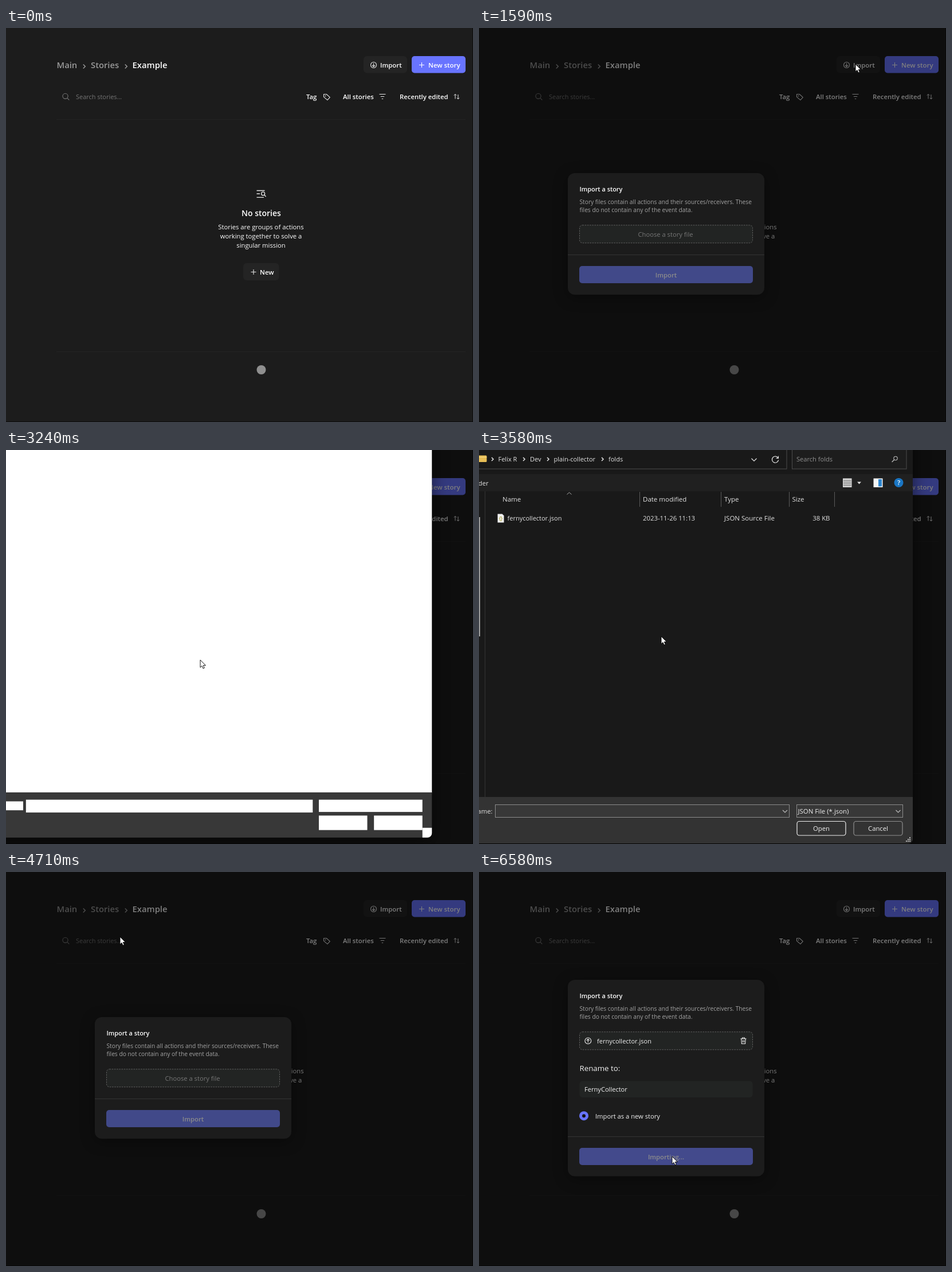
An HTML page for the animation above (8 s loop, 815 by 687 pixels).

```html
<!DOCTYPE html>
<html lang="en">
<head>
<meta charset="utf-8">
<title>Import a story</title>
<style>
  html, body { margin: 0; width: 100%; height: 100%; overflow: hidden; background: #1c1c1c; }
  svg { display: block; font-family: "Open Sans", "Noto Sans", sans-serif; }
  .modal { filter: drop-shadow(0 5px 12px rgba(0, 0, 0, .35)); }
  #dialog { filter: drop-shadow(0 6px 14px rgba(0, 0, 0, .55)); }
</style>
</head>
<body>
<svg id="stage" width="815" height="687"></svg>
<script>
const LOOP = 8000;
const STEP = 66.4;
const BLUE = '#6874ff';
const FILE = 'fernycollector.json';
const STORY = 'FernyCollector';

// Markup helpers; text is placed by the middle of its capitals.
const text = (x, cy, str, size, fill = '#f2f2f2', weight = 400, anchor = 'start', extra = '') =>
  `<text x="${x}" y="${(cy + size * .357).toFixed(2)}" font-size="${size}" fill="${fill}" font-weight="${weight}" text-anchor="${anchor}" ${extra}>${str}</text>`;
const bold = (x, cy, str, size = 11.35, fill = '#fff', anchor = 'start', extra = '') =>
  text(x, cy, str, size, fill, 600, anchor, extra);
const box = (x, y, w, h, fill, r = 0, extra = '') =>
  `<rect x="${x}" y="${y}" width="${w}" height="${h}" rx="${r}" fill="${fill}" ${extra}/>`;
const line = (d, color, width = 1.1, extra = '') =>
  `<path d="${d}" fill="none" stroke="${color}" stroke-width="${width}" ${extra}/>`;
const disc = (x, y, r, fill, extra = '') =>
  `<circle cx="${x}" cy="${y}" r="${r}" fill="${fill}" ${extra}/>`;
const ring = (x, y, r, color, width = 1.1) =>
  disc(x, y, r, 'none', `stroke="${color}" stroke-width="${width}"`);
const plus = (x, y, color) => line(`M${x - 4.5} ${y}h9M${x} ${y - 4.5}v9`, color, 1.1);
const chevron = (x, y, color, s = 3.5) =>
  line(`M${x - s / 2} ${y - s}l${s} ${s}l${-s} ${s}`, color, 1.5);
const chevronDown = (x, y, color, s = 4) =>
  line(`M${x - s} ${y - s / 2}l${s} ${s}l${s} ${-s}`, color, 1.2);

function page() {
  const grey = '#999', icon = '#e6e6e6';
  return box(0, 0, 815, 687, '#1c1c1c')
    + bold(88.5, 65, 'Main', 14.8, grey) + chevron(136.5, 67, grey)
    + bold(148, 65, 'Stories', 14.8, grey) + chevron(209.5, 67, grey)
    + bold(220.5, 65, 'Example', 14.8)
    + box(624, 49, 76, 29.5, '#242424', 6, 'id="importBtn"')
    + ring(641.5, 64.5, 5, icon) + line('M641.5 61.5v6M639 65l2.5 2.5l2.5 -2.5', icon)
    + bold(653, 64.5, 'Import')
    + box(708, 49, 94, 29.5, BLUE, 5) + plus(725.5, 64.5, '#fff')
    + bold(737, 64.5, 'New story', 11.4)
    + ring(103.5, 118.8, 4.6, '#777') + line('M107 122.3l3.3 3.3', '#777')
    + text(122, 120, 'Search stories...', 10.95, '#757575')
    + bold(524, 120, 'Tag')
    + line('M554.5 115.5h4.8l6 5.4l-4.4 4.8l-6.4 -5.6z', icon, 1.1, 'stroke-linejoin="round"')
    + disc(557.5, 118.4, .9, icon)
    + bold(588, 120, 'All stories')
    + line('M651.5 115.5h11M653.8 119.5h6.4M655.8 123.5h2.4', icon, 1)
    + bold(687, 120, 'Recently edited')
    + line('M784 123.5v-8M781.8 117.6l2.2 -2.2l2.2 2.2M789 116v8M786.8 121.8l2.2 2.2l2.2 -2.2', icon, 1)
    + box(88, 159, 714, 1, '#232323') + box(88, 564, 714, 1, '#232323')
    + line('M437.5 283.5h14M437.5 289h5.5M437.5 295.3h12.5', icon, 1.3)
    + ring(448.6, 288.8, 3, icon, 1.3) + line('M450.8 291l2.8 3', icon, 1.3)
    + bold(445.5, 323, 'No stories', 14, '#fff', 'middle')
    + ['Stories are groups of actions', 'working together to solve a', 'singular mission']
      .map((s, i) => text(445, 347.3 + i * 16, s, 11.25, '#fff', 400, 'middle')).join('')
    + box(414, 410, 62.5, 30, '#242424', 6) + plus(432, 425.5, icon) + bold(443, 425.5, 'New')
    + disc(445.5, 596, 8, '#8f8f8f')
    + box(814, 0, 1, 687, '#0c0c0c') + box(0, 686, 815, 1, '#0c0c0c');
}

function modal(id, top, height, body, divider) {
  return `<g id="${id}" class="modal">`
    + box(155, top, 343, height, '#1c1c1c', 12)
    + bold(175.5, top + 27.7, 'Import a story', 10.9)
    + text(175.5, top + 50, 'Story files contain all actions and their sources/receivers. These', 10.23, '#a3a3a3')
    + text(175.5, top + 64.5, 'files do not contain any of the event data.', 10.23, '#a3a3a3')
    + box(175.5, top + 90.8, 302, 31, '#222423', 5, 'stroke="#606060" stroke-dasharray="2.6 1.6"')
    + box(155, divider, 343, 1, '#343434')
    + body + '</g>';
}

function emptyForm() {
  return text(325.5, 360, 'Choose a story file', 11.2, '#777', 400, 'middle')
    + box(175, 415, 303, 30, '#414989', 5)
    + bold(326.5, 430.5, 'Import', 11.25, '#8b8b8b', 'middle');
}

function filledForm() {
  const waves = Array.from({ length: 25 }, () => 'l1.5 -1.6l1.5 1.6').join('');
  return ring(190.3, 294.4, 5.4, '#eee') + line('M190.3 297.5v-6M187.8 293.8l2.5 -2.5l2.5 2.5', '#eee')
    + text(206, 294.7, FILE, 11, '#f0f0f0')
    + line('M456.5 290.8h10M459.5 290.5v-1.5h4v1.5M457.8 291l.6 8.5h6.2l.6 -8.5M460.4 293.3v4M462.7 293.3v4', '#eee')
    + text(175.5, 342, 'Rename to:', 13.3, '#f2f2f2')
    + box(175.5, 364.5, 302, 28.5, '#222423', 5, 'id="field"')
    + text(184, 379, STORY, 11.1, '#f2f2f2')
    + `<g id="squiggle">${line('M184 386' + waves, '#a83232', .8)}</g>`
    + box(259.5, 371, 1.3, 16, '#fff', 0, 'id="caret"')
    + disc(183, 425.2, 8, BLUE) + disc(183, 425.2, 3, '#111')
    + text(203, 426, 'Import as a new story', 11.2, '#f2f2f2')
    + box(175, 481, 303, 30, BLUE, 5, 'id="submit"')
    + bold(326.5, 496.5, 'Import', 11.25, '#fff', 'middle', 'id="submitText"');
}

function dialog() {
  const ink = '#e2e2e2', rule = '#4c4c4c';
  const crumbs = [[33.5, 'Felix R'], [89, 'Dev'], [130.5, 'plain-collector'], [226, 'folds']];
  const footer = 'M-400 605H757V678a8 8 0 0 1 -8 8H-400Z';
  const controls = [[-60, 621, 83, 16], [28, 618, 515, 23], [554, 618, 186, 22],
    [554, 646.5, 87, 26], [653, 646.5, 87, 26]];
  const field = (x, w) => box(x + .5, 618.5, w, 22, '#383838', 0, 'stroke="#8c8c8c"');
  const button = (x, label, stroke) =>
    box(x + .5, 647.5, 85, 24.5, '#333', 4, `stroke="${stroke}" stroke-width="1.2"`)
    + text(x + 43, 660, label, 11.3, '#f2f2f2', 400, 'middle');
  return '<g id="dialog">'
    + box(-400, -200, 1157, 886, '#191919', 8)
    + '<g id="content">'
    + box(-10, -10, 547, 43, '#191919', 0, `stroke="${rule}"`)
    + box(546.5, -10, 199.5, 43, '#1d1d1d', 0, `stroke="${rule}"`)
    + box(-2, 9.5, 15.5, 11.5, '#e6bd55', 1.5) + box(-2, 12, 15.5, 1, '#f8dd8c')
    + [23.5, 78.5, 120.5, 215.5].map(x => chevron(x, 16, ink, 3)).join('')
    + crumbs.map(([x, s]) => text(x, 16, s, 11, ink)).join('')
    + chevronDown(480, 17, ink, 4.5)
    + line('M522 14a5.6 5.6 0 1 0 .6 3.4M522.4 10.5v3.8h-3.8', ink, 1.2)
    + text(554, 16.5, 'Search folds', 11.1, '#8f8f8f')
    + ring(727, 14.5, 3.2, '#bbb') + line('M724.6 17l-4 4', '#bbb', 1.3)
    + box(-10, 42, 767, 30, '#202020')
    + text(16.5, 57.5, 'New folder', 11.2, ink, 400, 'end')
    + box(635, 49.5, 15.5, 15.5, '#dcdcdc') + line('M636 53h13.5M636 56h13.5M636 59h13.5M636 62h13.5', '#555', 1)
    + `<path d="M660 55.5h7l-3.5 4z" fill="${ink}"/>`
    + box(688.5, 49.5, 16, 15.5, '#f4f4f4') + box(697, 51, 6, 12.5, '#2d86d0')
    + disc(732.5, 57, 8, '#1a76c4') + text(732.5, 57, '?', 11.5, '#fff', 600, 'middle')
    + line('M280.5 73v26M422.5 73v26M541.5 73v26M620.5 73v26', '#5a5a5a', 1)
    + line('M153.5 77.5l4 -3.5l4 3.5', '#aaa', 1)
    + [[41, 'Name'], [286, 'Date modified'], [428, 'Type'], [546.5, 'Size']]
      .map(([x, s]) => text(x, 86.3, s, 11.5, ink)).join('')
    + box(0, 117, 2, 208, '#9a9a9a') + box(10, 72, 1, 533, '#343434')
    + box(26.5, 105.5, 589.5, 26, 'none', 0, 'id="row"')
    + '<path d="M32.5 111.5h8l3 3v12h-11z" fill="#f0f0f0"/>'
    + text(38, 119.5, '{}', 8, '#a39a2c', 600, 'middle')
    + text(49.5, 119.2, FILE, 11, ink)
    + text(286, 119.2, '2023-11-26 11:13', 11.35, ink)
    + text(428, 119.2, 'JSON Source File', 11.5, ink)
    + text(612.5, 119.2, '38 KB', 11.4, ink, 400, 'end')
    + `<path d="${footer}" fill="#333"/>`
    + text(23.5, 630, 'File name:', 11.3, ink, 400, 'end')
    + field(28, 513) + field(554, 185)
    + text(31.5, 630, FILE, 11, '#f0f0f0', 400, 'start', 'id="fileName"')
    + text(556.5, 630, 'JSON File (*.json)', 11.4, '#f0f0f0')
    + chevronDown(534, 630, '#bbb') + chevronDown(731.5, 630, '#bbb')
    + button(554.5, 'Open', '#f0f0f0') + button(653.5, 'Cancel', '#8f8f8f')
    + [[0, 0], [3, 0], [6, 0], [3, -3], [6, -3], [6, -6]]
      .map(([x, y]) => box(745 + x, 681 + y, 2, 2, '#bdbdbd')).join('')
    + '</g><g id="blank">'
    + box(-400, -200, 1157, 805.5, '#fff')
    + `<path d="${footer}" fill="#383838"/>`
    + controls.map(([x, y, w, h]) => box(x, y, w, h, '#fff')).join('')
    + '<path d="M740 668.5H757V678a8 8 0 0 1 -8 8H740Z" fill="#fff"/>'
    + '</g></g>';
}

const stage = document.getElementById('stage');
stage.innerHTML = page()
  + box(0, 0, 815, 687, '#000', 0, 'id="dim" opacity=".5"')
  + modal('chooser', 253, 212, emptyForm(), 395)
  + modal('renamer', 188, 342.5, filledForm(), 461)
  + dialog()
  + '<g id="cursor">'
  + disc(0, 0, 12, 'rgba(255,227,10,.62)', 'id="press"')
  + `<g id="busy">${ring(12, 0, 4.6, '#4aa3e0', 2)}</g>`
  + '<path d="M0 0V13.2L3 10.4L5 15L7.3 14L5.3 9.6H9.4Z" fill="#fff" stroke="#000" stroke-width=".9"/>'
  + '</g>';

const el = {};
stage.querySelectorAll('[id]').forEach(n => el[n.id] = n);

// Pointer path: time, x, y of the tip.
const path = [
  [0, 735, 702], [200, 735, 702], [260, 733, 674], [400, 728, 560], [600, 714, 300],
  [740, 702, 165], [800, 694, 124], [870, 668, 104], [930, 657, 70], [1000, 656, 59.5], [1060, 657, 63],
  [1785, 657, 63], [1850, 648, 74], [1990, 570, 160], [2120, 440, 285], [2250, 350, 358],
  [2310, 336, 368], [2380, 339, 366],
  [3440, 339, 366], [3580, 318, 325], [3720, 262, 224], [3850, 214, 140], [3970, 201, 116], [4040, 199, 113],
  [4900, 199, 113], [5100, 222, 155], [5240, 262, 238], [5370, 284, 283], [5560, 298, 325],
  [5770, 316, 371], [5900, 327, 430], [6050, 336, 498], [6120, 337, 496], [LOOP, 337, 496]
];
const clicks = [[1250, 1390], [2580, 2710], [4180, 4250], [4370, 4575], [6450, 6580]];

function pointerAt(t) {
  const i = Math.max(1, path.findIndex(k => k[0] >= t));
  const [t0, x0, y0] = path[i - 1], [t1, x1, y1] = path[i];
  const u = (t - t0) / (t1 - t0);
  return [x0 + (x1 - x0) * u, y0 + (y1 - y0) * u];
}

const within = (t, a, b) => t >= a && t < b;
const show = (node, on) => node.setAttribute('display', on ? 'inline' : 'none');
const paint = (node, fill) => node.setAttribute('fill', fill);
const clamp = v => Math.min(1, Math.max(0, v));

function drawDialog(t, q) {
  const open = within(t, 3175, 4690);
  show(el.dialog, open);
  if (!open) return;
  const grow = clamp((q - 3150) / 200), leave = clamp((q - 4497) / 190);
  const scale = 1 - .213 * (1 - grow) ** 3 - .08 * leave ** 2;
  el.dialog.setAttribute('transform', `translate(270 325) scale(${scale}) translate(-270 -325)`);
  el.dialog.setAttribute('opacity', Math.min(1, grow * 2.5) * (1 - leave));
  show(el.blank, t < 3375);
  show(el.content, t >= 3375);
  paint(el.row, t >= 4180 ? '#757575' : t >= 3900 ? '#4d4d4d' : 'none');
  show(el.fileName, t >= 4180);
}

function draw(t) {
  const q = Math.max(0, 260 + Math.floor((t - 260) / STEP + .15) * STEP);
  const [x, y] = pointerAt(Math.min(q, LOOP));
  el.cursor.setAttribute('transform', `translate(${x.toFixed(1)} ${y.toFixed(1)})`);
  show(el.press, clicks.some(([a, b]) => within(t, a, b)));
  show(el.busy, within(t, 2850, 2980));

  paint(el.importBtn, within(t, 1250, 1590) ? '#2b2b2b' : '#242424');
  show(el.dim, t >= 1590);
  show(el.chooser, within(t, 1590, 4970));
  show(el.renamer, t >= 4970);
  drawDialog(t, q);

  const focused = t < 6450, sent = t >= 6580;
  el.field.setAttribute('stroke', focused ? BLUE : 'none');
  show(el.squiggle, focused);
  show(el.caret, focused && Math.floor((t - 4970) / 530) % 2 === 0);
  paint(el.submit, sent ? '#434a8c' : t >= 6040 ? '#5f6bee' : BLUE);
  paint(el.submitText, sent ? '#8d8d8d' : '#fff');
  el.submitText.textContent = sent ? 'Importing...' : 'Import';
}

const start = performance.now();
function tick() {
  draw((performance.now() - start) % LOOP);
  requestAnimationFrame(tick);
}
tick();
</script>
</body>
</html>
```
